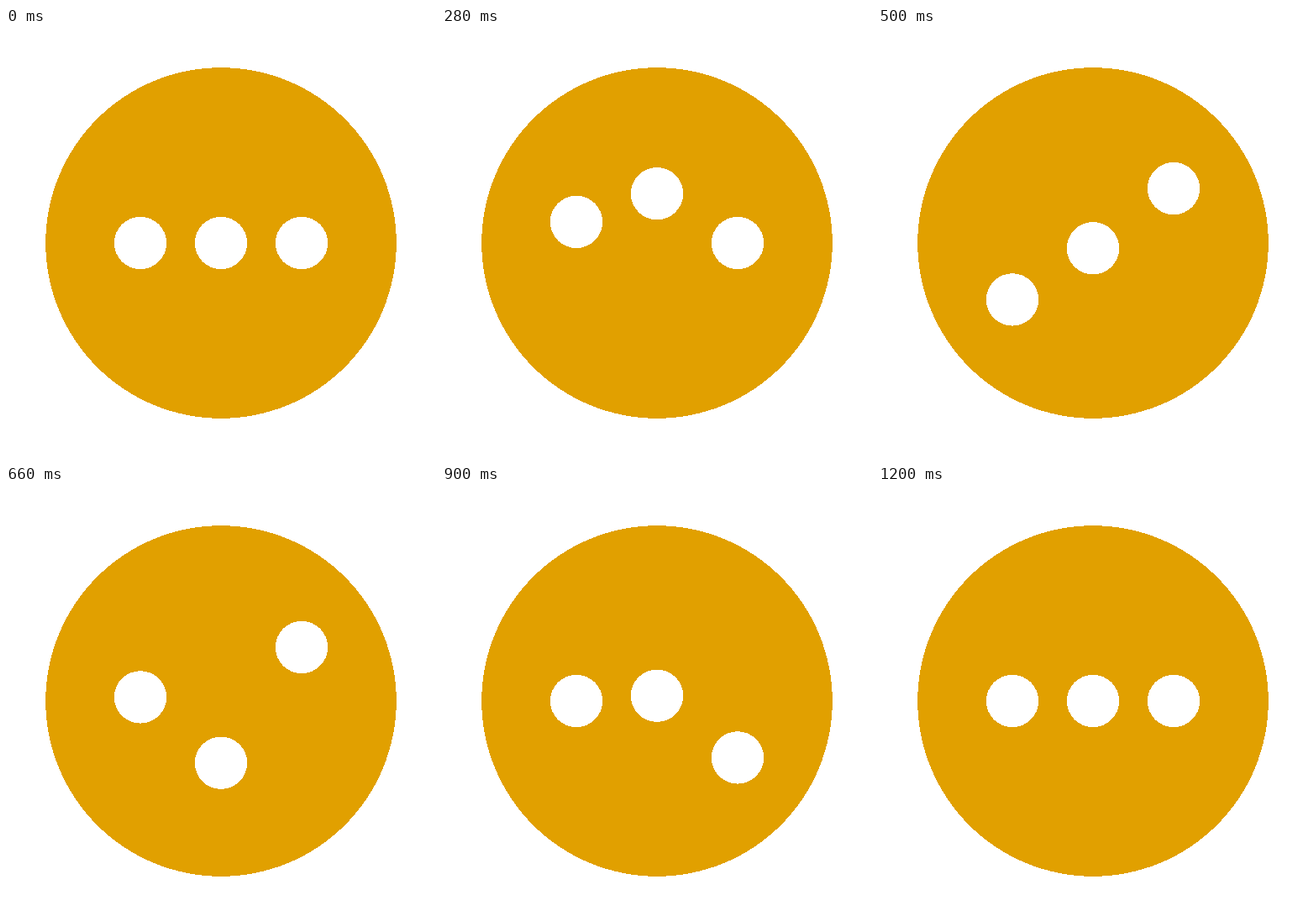
Recreate the animation shown at these times as an HTML page. Size 512 px wide and 512 px high, loop 1.22 s.

```html
<!DOCTYPE html>
<html lang="en">
<head>
<meta charset="utf-8">
<title>Typing dots</title>
<style>
  html, body { margin: 0; width: 100%; height: 100%; overflow: hidden; background: #fff; }
  svg { display: block; width: 100%; height: 100%; shape-rendering: crispEdges; }
</style>
</head>
<body>
<svg viewBox="0 0 512 512">
  <circle cx="256" cy="256" r="208.8" fill="#e1a000"/>
  <g fill="#fff">
    <circle class="dot" cx="160" cy="256" r="31.2"/>
    <circle class="dot" cx="256" cy="256" r="31.2"/>
    <circle class="dot" cx="352" cy="256" r="31.2"/>
  </g>
</svg>
<script>
const LOOP = 1220, TICK = 20, STAGGER = 200;
const TIMES = [0, 260, 540, 800];
const HEIGHTS = [256, 192, 320, 256];
const dots = document.querySelectorAll('.dot');

function easeOutBack(x) {
  const s = 1.70158, p = x - 1;
  return 1 + p * p * ((s + 1) * p + s);
}

function heightAt(t) {
  if (t <= 0 || t >= TIMES[3]) return HEIGHTS[0];
  const i = TIMES.findIndex(end => t <= end);
  const x = (t - TIMES[i - 1]) / (TIMES[i] - TIMES[i - 1]);
  return HEIGHTS[i - 1] + (HEIGHTS[i] - HEIGHTS[i - 1]) * easeOutBack(x);
}

function draw() {
  const t = Math.floor(performance.now() % LOOP / TICK) * TICK;
  dots.forEach((dot, i) => dot.setAttribute('cy', heightAt(t - i * STAGGER)));
  requestAnimationFrame(draw);
}
draw();
</script>
</body>
</html>
```
